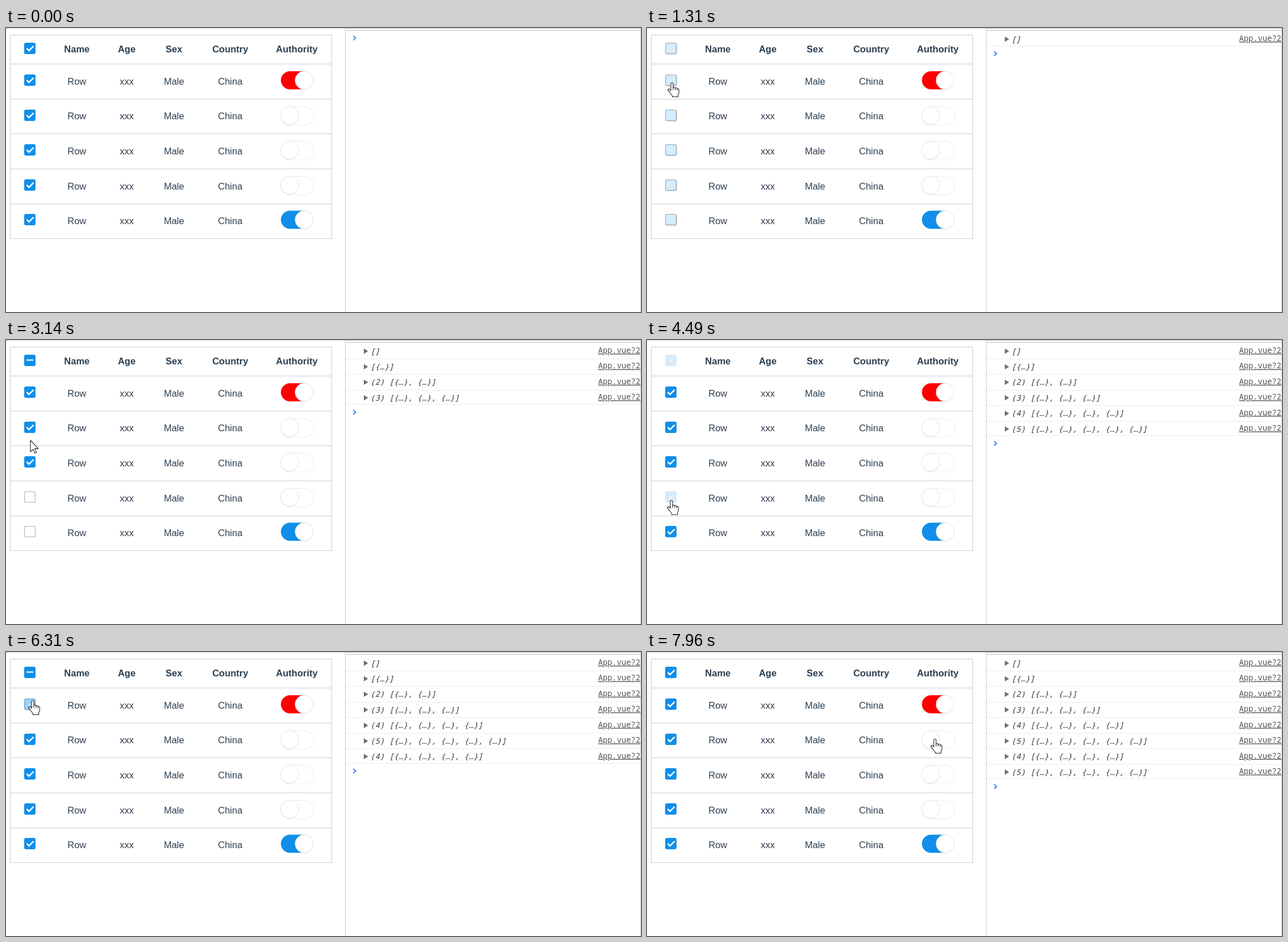
An HTML page that plays this animation: 1118x501 px, repeating every 8 s.

```html
<!DOCTYPE html>
<html lang="en">
<head>
<meta charset="utf-8">
<title>Table selection</title>
<style>
  html, body { margin: 0; width: 100%; height: 100%; overflow: hidden; background: #fff; }
  svg { display: block; width: 1118px; height: 501px; }
  .cell { font: 16.5px "Liberation Sans", Arial, sans-serif; fill: #2c3e50; text-anchor: middle; }
  .head { font-weight: bold; }
  .log { font: italic 13.75px "Noto Sans Mono", "DejaVu Sans Mono", monospace; fill: #303942; }
  .link { font: 13.75px "Noto Sans Mono", "DejaVu Sans Mono", monospace; fill: #545454; text-decoration: underline; }
</style>
</head>
<body>
<svg viewBox="0 0 1118 501">
  <g id="back"></g>
  <g id="live"></g>
  <path d="M597.5 0V501M1117.5 0V501" stroke="#ccc" fill="none"/>
  <g id="pointer"></g>
</svg>
<script>
const LOOP = 8000, FADE = 170, BLUE = '#108ee9';
const PITCH = 61.6, LOG_PITCH = 27.45;
const ROW_Y = [0, 1, 2, 3, 4].map(i => Math.round(92.2 + 61.5 * i));
const BOX_Y = [36, ...ROW_Y];
const COLUMNS = [['Name', 'Row', 124.8], ['Age', 'xxx', 212.5], ['Sex', 'Male', 295.8],
                 ['Country', 'China', 394.8], ['Authority', '', 512]];
const SWITCHES = ['red', '', '', '', BLUE];

// Where the pointer goes: departure time, x, y, click time
const ENTRY = { x: 690, y: 443 };
const VISITS = [
  [70, 40, 36, 1170], [1170, 44, 96.5, 1720], [2050, 40, 162, 2276], [2450, 40, 213, 2905],
  [2930, 43, 177], [3200, 41, 335, 3850], [3950, 43, 283, 4461], [4700, 39, 38],
  [5840, 47, 85.5, 6210], [6500, 47, 85.5, 6710], [6800, 42, 190], [7340, 507, 153.5]
].map(([at, x, y, click]) => ({ at, x, y, click }));

const $ = id => document.getElementById(id);
const text = (x, y, cls, s) => `<text x="${x}" y="${y}" class="${cls}">${s}</text>`;
const ease = p => p * p * (3 - 2 * p);
const boxAt = (x, y) => Math.abs(x - 42) < 11 ? BOX_Y.findIndex(b => Math.abs(y - b) < 11) : -1;

function toggle(y, color) {
  const knob = x => `<circle cx="${x}" cy="${y + 1}" r="16" fill="#000" opacity=".05"/>
    <circle cx="${x}" cy="${y}" r="16" fill="#fff" stroke="#e3e3e3"/>`;
  return color
    ? `<rect x="484" y="${y - 16}" width="56" height="32" rx="16" fill="${color}"/>` + knob(525)
    : `<rect x="484" y="${y - 15.5}" width="58" height="33" rx="16.5" fill="#fff" stroke="#ececec"/>` + knob(499.5);
}

function backdrop() {
  let s = `<rect x="598" y="1" width="520" height="3" fill="#f3f3f3"/>
    <path d="M0 .5H1118M598 4.5H1118" stroke="#ccc"/>
    <rect x="7.5" y="12.5" width="566" height="359" fill="none" stroke="#ccc"/>`;
  ROW_Y.forEach((y, i) => {
    s += `<path d="M7 ${Math.floor(63.7 + PITCH * i) + .5}H574" stroke="#ccc"/>` + toggle(y + .3, SWITCHES[i]);
  });
  for (const [title, value, x] of COLUMNS) {
    s += text(x, 43, 'cell head', title);
    ROW_Y.forEach((_, i) => s += text(x, Math.round(99.8 + PITCH * i), 'cell', value));
  }
  return s;
}

function stateAt(t) {
  const boxes = BOX_Y.map(() => ({ mark: 'check', since: -FADE }));
  const [header, ...rows] = boxes;
  const logs = [];
  const set = (box, mark, since) => {
    if (box.mark !== mark) Object.assign(box, { mark, since });
  };
  for (const { x, y, click } of VISITS.filter(v => v.click <= t)) {
    const box = boxes[boxAt(x, y)];
    const mark = box.mark === 'check' ? '' : 'check';
    (box === header ? rows : [box]).forEach(b => set(b, mark, click));
    const count = rows.filter(b => b.mark).length;
    set(header, count === rows.length ? 'check' : count ? 'part' : '', click);
    logs.push(count);
  }
  return { boxes, logs };
}

function checkbox({ mark, since }, y, t) {
  const p = Math.min(1, (t - since) / FADE);
  const a = mark === 'part' ? 1 : mark ? p : 1 - p;
  let s = '';
  if (!mark) {
    if (a) s += '<rect x="-8.5" y="-8.5" width="19" height="19" rx="3" fill="#fff" stroke="#000" stroke-opacity=".18"/>';
    s += '<rect x="-9.4" y="-9.4" width="18.8" height="18.8" rx="2.5" fill="#fff" stroke="#bfbfbf" stroke-width="1.4"/>';
  }
  s += `<rect x="-10" y="-10" width="20" height="20" rx="3" fill="${BLUE}" opacity="${a}"/>`;
  if (mark === 'part') s += '<path d="M-6-.6H6" stroke="#fff" stroke-width="2.2"/>';
  else if (a) s += `<path d="M-5.5 0L-1.5 4L6.5-4.2" fill="none" stroke="#fff" stroke-width="2.5"
    opacity="${mark ? 1 : a}" transform="scale(${.3 + .7 * a})"/>`;
  return `<g transform="translate(42 ${y})">${s}</g>`;
}

function consoleView(logs) {
  let s = '';
  logs.forEach((n, i) => {
    const y = LOG_PITCH * i, isLast = i === logs.length - 1;
    const items = Array(n).fill('{…}').join(', ');
    s += `<path d="M630 ${y + 15}l7.5 4.7l-7.5 4.7z" fill="#6e6e6e"/>`
      + text(641.4, y + 24.5, 'log', (n > 1 ? `(${n}) ` : '') + `[${items}]`)
      + text(1042.6, y + 23, 'link', 'App.vue?2')
      + `<path d="M598 ${Math.floor(y + (isLast ? 31.5 : 33.5)) + .5}H1118" stroke="#ececec"/>`;
  });
  const color = logs.length ? '#367cf1' : '#3598dc';
  return s + `<path d="M611.3 ${13.8 + LOG_PITCH * logs.length}l4.2 3.9l-4.2 3.9" fill="none"
    stroke="${color}" stroke-width="1.9"/>`;
}

const HAND = `<path d="M-2 2Q-2 0 0 0Q2 0 2 2V9Q2.3 8 4 8Q5.6 8 5.8 9.6Q6.5 8.8 7.8 9Q9.2 9.2 9.4 10.8
  Q10.2 10.2 11 10.6Q12.3 11 12.3 13V17Q12.3 19 10.6 21.5V25H.5V23L-3.5 18Q-5 15.5-6.5 14Q-8 12.5-6.5 11.4
  Q-5 10.6-3.4 12.2L-2 13.8Z" fill="#fff"/><path d="M2 9V13M5.8 9.6V13.3M9.4 10.8V13.8" fill="none"/>`;
const ARROW = '<path d="M0 0V20L4.6 15.8L7.6 22.6L10.6 21.3L7.6 14.6H14Z" fill="#fff"/>';

function pointer(t) {
  const i = VISITS.filter(v => v.at <= t).length - 1;
  if (i < 0) return '';
  const from = VISITS[i - 1] || ENTRY, to = VISITS[i];
  const dx = to.x - from.x, dy = to.y - from.y;
  // Longer trips take longer
  const p = ease(Math.min(1, (t - to.at) / (80 + Math.hypot(dx, dy))));
  const x = from.x + dx * p, y = from.y + dy * p;
  const overSwitch = Math.abs(x - 513) < 29 && ROW_Y.some(r => Math.abs(y - r) < 17);
  return `<g transform="translate(${x} ${y})" stroke="#222" stroke-width="1.1" stroke-linejoin="round">
    ${overSwitch || boxAt(x, y) >= 0 ? HAND : ARROW}</g>`;
}

function draw(t) {
  const { boxes, logs } = stateAt(t);
  $('live').innerHTML = boxes.map((b, i) => checkbox(b, BOX_Y[i], t)).join('') + consoleView(logs);
  $('pointer').innerHTML = pointer(t);
}

$('back').innerHTML = backdrop();
const start = performance.now();

function frame() {
  draw((performance.now() - start) % LOOP);
  requestAnimationFrame(frame);
}
frame();
</script>
</body>
</html>
```
